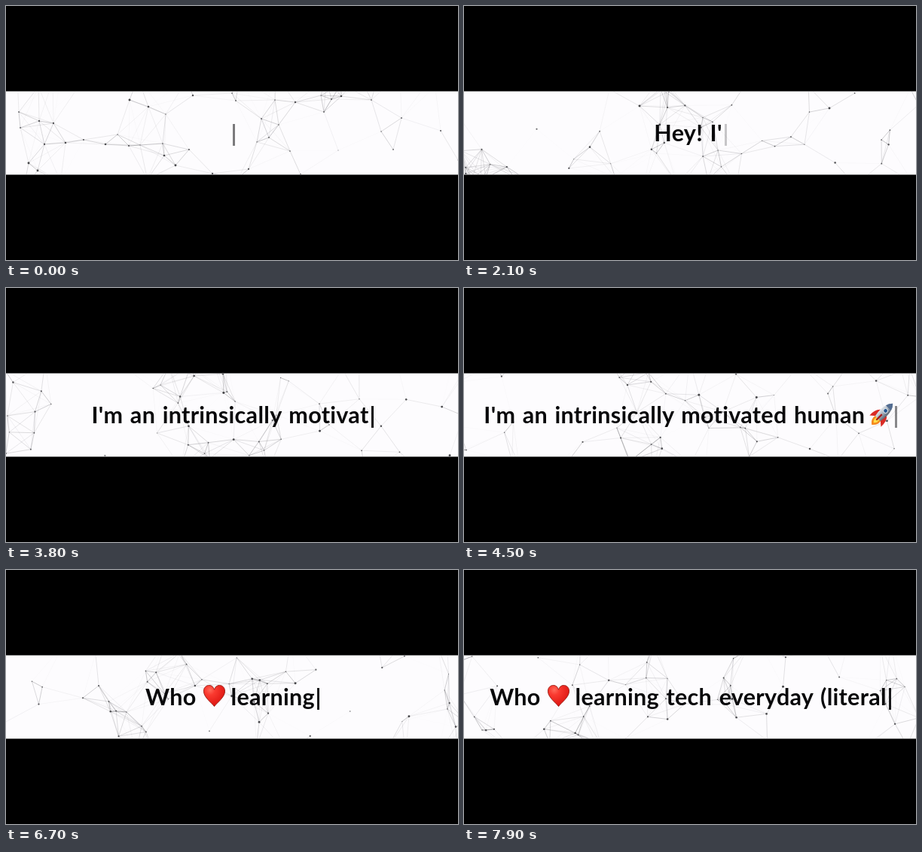
Animation of 600 by 338 pixels, one loop 8 s. Source, as an HTML page with a canvas:

```html
<!DOCTYPE html>
<html lang="en">
<head>
<meta charset="utf-8">
<title>Typed greeting</title>
<style>
  html, body { margin: 0; width: 100%; height: 100%; overflow: hidden; background: #000; }
  #band {
    position: absolute; left: 0; top: 113px; width: 600px; height: 110px; overflow: hidden;
    background: #fdfcfe; border: solid #7d7d7e; border-width: 1px 0;
  }
  canvas { position: absolute; left: 0; top: 0; width: 600px; height: 110px; }
  #line {
    position: absolute; left: 0; top: 34px; width: 601px; height: 40px;
    font: 700 30.5px/40px Lato, "Open Sans", sans-serif;
    letter-spacing: .3px; word-spacing: 1.8px;
    text-align: center; white-space: pre; color: #08080a;
  }
  #line svg { width: 31px; height: 31px; margin: 0 -2.5px 0 -1.5px; vertical-align: -3px; overflow: visible; }
  #cursor { display: inline-block; width: 3px; height: 29px; margin-left: 3px; vertical-align: -6px; background: #08080a; }
</style>
</head>
<body>
<div id="band">
  <canvas></canvas>
  <div id="line"><span id="typed"></span><span id="cursor"></span></div>
</div>
<script>
const LOOP = 8000, STEP = 100, TYPE_MS = 52, ERASE_MS = 16.7;
const W = 600, H = 110, TOP = 114;

const phrases = [
  { text: "Hey! I'm Benilo 👋", start: 30, erase: 1930 },
  { text: "I'm an intrinsically motivated human 🚀", start: 2310, erase: 5310 },
  { text: "Who ❤ learning tech everyday (literally)", start: 5950, erase: LOOP }
].map(p => ({ ...p, chars: Array.from(p.text) }));

const svg = body => `<svg viewBox="0 0 32 32">${body}</svg>`;
const fingers = "M20 21L6.5 10M21 18L12.5 5M18 23L5.5 15.500M19 26L9 21.500M26 21Q29.500 16 26.500 9";
const hand = (color, width, radius) =>
  `<path d="${fingers}" fill="none" stroke="${color}" stroke-width="${width}" stroke-linecap="round"/>
   <circle cx="22" cy="22" r="${radius}" fill="${color}"/>`;

const icons = {
  "👋": svg(`${hand("#c87a14", 5.8, 9.3)}${hand("#ffc233", 4.2, 8.5)}
    <path d="M9 9l9 9M8 14l9 6.500M10 19.500l7 4M22 19q-3 3-1 7" fill="none" stroke="#d08a1c" stroke-width="1"/>
    <path d="M0 19q1 6 6 9M3.500 20q1 4 4 6M18 0q5 1 7 5M17 3.500q3.500 1 5 4" fill="none" stroke="#454549" stroke-width="1.300" stroke-linecap="round"/>`),
  "🚀": svg(`<defs><linearGradient id="hull"><stop stop-color="#e4e8ec"/><stop offset=".55" stop-color="#9ba7b4"/><stop offset="1" stop-color="#56616f"/></linearGradient></defs>
    <g transform="rotate(45 16 16)">
      <path d="M11 24Q9 32 16 37Q23 32 21 24z" fill="#f58a1f"/>
      <path d="M13.500 24Q12 30 16 33Q20 30 18.500 24z" fill="#ffe14a"/>
      <path d="M11 13Q4 18 5 30L12 24zM21 13Q28 18 27 30L20 24z" fill="#d92b25"/>
      <path d="M16-4Q25 5 21 25H11Q7 5 16-4z" fill="url(#hull)"/>
      <path d="M16-4Q20 0 21 4.500H11Q12 0 16-4z" fill="#536d91"/>
      <circle cx="16" cy="10" r="3" fill="#27578f" stroke="#dce3e9"/>
      <path d="M16 17v11" stroke="#a91c1c" stroke-width="2.400"/>
    </g>`),
  "❤": svg(`<defs><radialGradient id="glow" cx=".3" cy=".22" r=".8"><stop stop-color="#ff6a5a"/><stop offset=".3" stop-color="#fa3a30"/><stop offset="1" stop-color="#dc1410"/></radialGradient></defs>
    <path d="M16 30.500C12 25 1.500 18 1.500 9.500C1.500 4.500 5 1.500 9 1.500C12.500 1.500 15 4 16 7.500C17 4 19.500 1.500 23 1.500C27 1.500 30.500 4.500 30.500 9.500C30.500 18 20 25 16 30.500z" fill="url(#glow)" stroke="#9c2018" stroke-width="1"/>`)
};

function seeded(seed) {
  return () => (seed = (seed * 16807) % 2147483647) / 2147483647;
}
const random = seeded(4127);
const between = (a, b) => a + (b - a) * random();

// Drifting network: visible starting points plus some waiting outside the band
const starts = [
  17,141, 44,153, 19,162, 63,156, 51,184, 79,182, 30,209, 42,219, 103,178, 132,184,
  148,171, 163,186, 178,185, 164,125, 189,134, 212,144, 208,183, 243,191, 210,199, 225,212,
  248,119, 274,223, 305,126, 300,116, 357,125, 384,128, 339,150, 362,158, 349,175, 333,181,
  322,217, 377,193, 391,224, 441,192, 422,141, 432,124, 445,120, 418,119, 485,125, 498,167,
  514,191, 525,149, 577,166, 600,205, 93,112
];
const FIELD = { x: -15, y: -27, w: 630, h: 163 }, REACH = 66, SPEED = 65;
const particles = [];
function addParticle(x, y) {
  particles.push({ x, y, vx: between(-SPEED, SPEED), vy: between(-SPEED, SPEED), r: between(.5, 1.5) });
}
for (let i = 0; i < starts.length; i += 2) addParticle(starts[i], starts[i + 1] - TOP);
for (const x of [15, 62, 175, 310, 425, 445, 470, 560]) addParticle(x, between(-24, -10));
for (let i = 0; i < 12; i++) addParticle(between(0, W), i % 3 ? between(-25, -4) : between(H + 4, H + 25));

const wrap = (v, min, size) => min + ((v - min) % size + size) % size;

const canvas = document.querySelector("canvas"), ctx = canvas.getContext("2d");
const scale = window.devicePixelRatio || 1;
canvas.width = W * scale;
canvas.height = H * scale;

function drawNetwork(ms) {
  const s = ms / 1000;
  const points = particles.map(p => ({
    x: wrap(p.x + p.vx * s, FIELD.x, FIELD.w),
    y: wrap(p.y + p.vy * s, FIELD.y, FIELD.h),
    r: p.r
  }));
  ctx.setTransform(scale, 0, 0, scale, 0, 0);
  ctx.clearRect(0, 0, W, H);
  ctx.lineWidth = .6;
  points.forEach((a, i) => {
    for (const b of points.slice(i + 1)) {
      const d = Math.hypot(a.x - b.x, a.y - b.y);
      if (d >= REACH) continue;
      ctx.strokeStyle = `rgba(50,50,54,${.55 * (1 - d / REACH)})`;
      ctx.beginPath();
      ctx.moveTo(a.x, a.y);
      ctx.lineTo(b.x, b.y);
      ctx.stroke();
    }
  });
  for (const p of points) {
    ctx.fillStyle = `rgba(50,50,54,${.45 + .3 * p.r})`;
    ctx.beginPath();
    ctx.arc(p.x, p.y, p.r, 0, 7);
    ctx.fill();
  }
}

// CSS "ease" timing curve
function ease(x) {
  let lo = 0, hi = 1;
  const bezier = (u, a, b) => 3 * (1 - u) ** 2 * u * a + 3 * (1 - u) * u * u * b + u ** 3;
  for (let i = 0; i < 20; i++) {
    const mid = (lo + hi) / 2;
    if (bezier(mid, .25, .25) < x) lo = mid; else hi = mid;
  }
  return bezier(lo, .1, 1);
}

function cursorOpacity(ms) {
  const phase = wrap(ms / 1000 - .36, 0, 1) * 2;
  return phase < 1 ? ease(phase) : 1 - ease(phase - 1);
}

function typedText(ms) {
  const { chars, start, erase } = phrases.filter(p => p.start <= ms).pop() || phrases[0];
  const added = Math.min(chars.length, Math.max(0, Math.floor((ms - start) / TYPE_MS)));
  const removed = Math.max(0, Math.floor((ms - erase) / ERASE_MS));
  return chars.slice(0, Math.max(0, added - removed)).map(c => icons[c] || c).join("");
}

const typed = document.getElementById("typed"), cursor = document.getElementById("cursor");
let shown = -1;

function render(ms) {
  typed.innerHTML = typedText(ms);
  cursor.style.opacity = cursorOpacity(ms);
  drawNetwork(ms);
}

const origin = performance.now();
function tick() {
  const ms = Math.floor((performance.now() - origin) % LOOP / STEP) * STEP;
  if (ms !== shown) render(shown = ms);
  requestAnimationFrame(tick);
}
tick();
</script>
</body>
</html>
```
